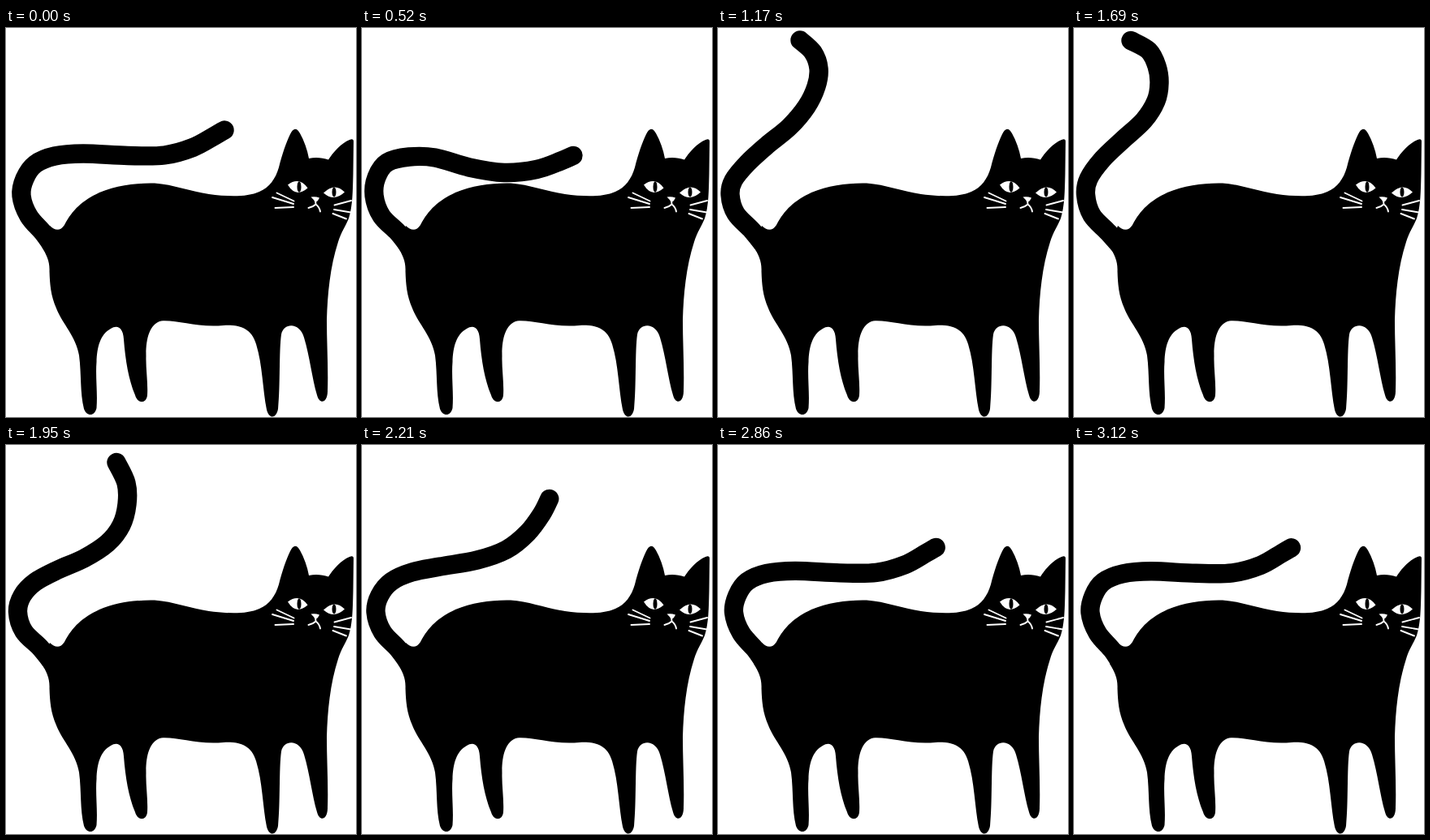
An HTML page for the animation above (3.25 s loop, 431 px wide and 480 px high).

```html
<!DOCTYPE html>
<html lang="en">
<head>
<meta charset="utf-8">
<title>Black cat</title>
<style>
  html, body { margin: 0; width: 100%; height: 100%; overflow: hidden; background: #fff; }
  svg { display: block; width: 100vw; height: 100vh; }
</style>
</head>
<body>
<svg viewBox="0 0 431 480" preserveAspectRatio="none">
  <path id="tail" fill="none" stroke="#000" stroke-width="23.4" stroke-linecap="round" stroke-linejoin="round"/>
  <path d="M54 244 C60 250 67 251 72 243 C82 224 94 213 115 203 C136 194 160 191 183 191.500
    C206 193 228 202 250 205 C272 208 297 209 312 202 C324 197 332 186 336 172
    C340 156 345 141 350 131 C354 123 358 123 362 130 C367 139 371 150 373 161
    C381 159 390 160 397 162.500 C403 153 413 142 423 138 Q428 136 428 140
    L427.500 180 C427 200 427 220 422 235 C418 245 413 251 409 264 C399 295 396 328 395 360
    C395 390 397 420 396 448 C396 463 386 465 383 453 C377 433 374 405 367 382
    C362 363 342 363 339 378 C336 400 338 440 335 470 C333 482 324 483 321 471
    C316 446 316 416 308 390 C302 370 287 366 268 367 C234 370 212 360 191 361.500
    C176 365 172 386 172.500 405 C172 420 175 438 174 453 C173 464 162 464 159 453
    C151 434 147 410 145 384 C144 369 137 366 129 371 C116 378 112 394 111.500 412
    C110 430 113 450 111.500 469 C109 480 99 479 96 470 C91 450 93 427 90 404
    C86 380 70 366 62 346 C55 330 54 316 53.500 300 C54 288 50 280 44 270 Z"/>
  <g fill="none" stroke="#fff" stroke-width="1.900" stroke-linecap="round">
    <path d="M333.500 203.500 L354.500 213.500 M328 209 L354 217 M331.500 222 L354 221
      M404.500 218.500 L425 213 M404 224 L424.500 227.500 M402.500 229 L419 235.500"/>
    <path d="M381 213 L381.500 217.500 Q378 221 372.500 222 M381.500 217.500 Q386 221 387 226.500"/>
  </g>
  <path d="M375.500 208.500 Q381 207.500 386 209.500 Q384.500 213.500 381 215.500 Q379 211.500 375.500 208.500Z" fill="#fff"/>
  <g id="open">
    <path d="M347 193.500 Q361 183 371.500 197.500 Q357 210 347 193.500Z
      M391 203.500 Q405 190 417 202.500 Q404 215 391 203.500Z" fill="#fff"/>
    <ellipse cx="361" cy="196" rx="2.500" ry="6.700"/>
    <ellipse cx="404" cy="202.500" rx="2.500" ry="6"/>
  </g>
  <path id="shut" d="M348.500 198 Q358 204.500 371 201.500 M392.500 205 Q402 209.500 411.500 205"
    fill="none" stroke="#fff" stroke-width="1.600" stroke-linecap="round"/>
</svg>
<script>
const STEP = 130, COUNT = 25;
const ROOT = [58, 270];
const $ = id => document.getElementById(id);

// Joint positions along the tail, root excluded
const rest = [46,253, 28,232, 19,207, 23,186, 36,168, 60,158, 95,155, 150,157.5, 195,157, 230,147.5, 257,133, 269,126];
const low = [44,252, 24,232, 15,207, 18,184, 31,166, 58,159, 90,160, 132,172, 175,178.5, 215,174.5, 245,164, 260,157.5];
const up = [42,250, 22,229, 15,206, 19,188, 36,167, 60,145, 88,122, 109,97, 121,72, 124,50, 117,30, 101,15];
const left = [42,252, 22,231, 14.5,206, 18,186, 35,162, 60,138, 86,114, 101,90, 105,68, 102,47, 92,28, 70,15.5];
const back = [42,250, 22,230, 14.5,206, 20,186, 36,169, 64,154, 96,140, 125,121, 142,99, 149,73, 148,47, 136,21.5];
const settled = rest.map((v, i) => i < 8 ? v + (i % 2 ? 0 : 1) : v + (i % 2 ? 0.8 : i > 18 ? -1.5 : 0));

// Describe a pose as segment lengths and continuous headings
function bend(pts) {
  const out = [];
  let [x, y] = ROOT, prev = -2;
  for (let i = 0; i < pts.length; i += 2) {
    const dx = pts[i] - x, dy = pts[i + 1] - y;
    let a = Math.atan2(dy, dx);
    a += Math.round((prev - a) / (2 * Math.PI)) * 2 * Math.PI;
    out.push(Math.hypot(dx, dy), a);
    prev = a;
    x = pts[i];
    y = pts[i + 1];
  }
  return out;
}

const P = { rest: bend(rest), low: bend(low), up: bend(up), left: bend(left), back: bend(back), settled: bend(settled) };
P.far = P.left.map((v, i) => v + (v - P.up[i]) * 0.5);

const keys = [
  [-1, P.settled], [0, P.rest], [4, P.low], [9, P.up], [11.5, P.far], [13, P.left],
  [15, P.back], [19, P.rest], [20, P.rest], [24, P.settled], [25, P.rest]
];

const slope = (k, i) => (keys[k + 1][1][i] - keys[k][1][i]) / (keys[k + 1][0] - keys[k][0]);

function tangent(k, i) {
  if (k === 0 || k === keys.length - 1) return 0;
  const a = slope(k - 1, i), b = slope(k, i);
  return a * b <= 0 ? 0 : 2 * a * b / (a + b);
}

function poseAt(t) {
  let k = 0;
  while (k < keys.length - 2 && t >= keys[k + 1][0]) k++;
  const [t0, p] = keys[k], [t1, q] = keys[k + 1];
  const h = t1 - t0, u = (t - t0) / h, v = 1 - u;
  return p.map((a, i) =>
    a * (1 + 2 * u) * v * v + q[i] * u * u * (3 - 2 * u) +
    h * u * v * (tangent(k, i) * v - tangent(k + 1, i) * u));
}

function tailPath(pose) {
  const pts = [ROOT];
  let [x, y] = ROOT;
  for (let i = 0; i < pose.length; i += 2) {
    x += pose[i] * Math.cos(pose[i + 1]);
    y += pose[i] * Math.sin(pose[i + 1]);
    pts.push([x, y]);
  }
  const at = i => pts[Math.max(0, Math.min(pts.length - 1, i))];
  let d = "M" + ROOT;
  for (let i = 0; i < pts.length - 1; i++) {
    const [a, b, c, e] = [at(i - 1), at(i), at(i + 1), at(i + 2)];
    const c1 = b.map((v, j) => (v + (c[j] - a[j]) / 6).toFixed(2));
    const c2 = c.map((v, j) => (v - (e[j] - b[j]) / 6).toFixed(2));
    d += `C${c1} ${c2} ${c.map(v => v.toFixed(2))}`;
  }
  return d;
}

function draw(ms) {
  const n = Math.floor(ms / STEP) % COUNT;
  const asleep = n >= 18 && n <= 21;
  $("tail").setAttribute("d", tailPath(poseAt(n)));
  $("open").style.display = asleep ? "none" : "";
  $("shut").style.display = asleep ? "" : "none";
}

const start = performance.now();
function tick() {
  draw(performance.now() - start);
  requestAnimationFrame(tick);
}
tick();
</script>
</body>
</html>
```
